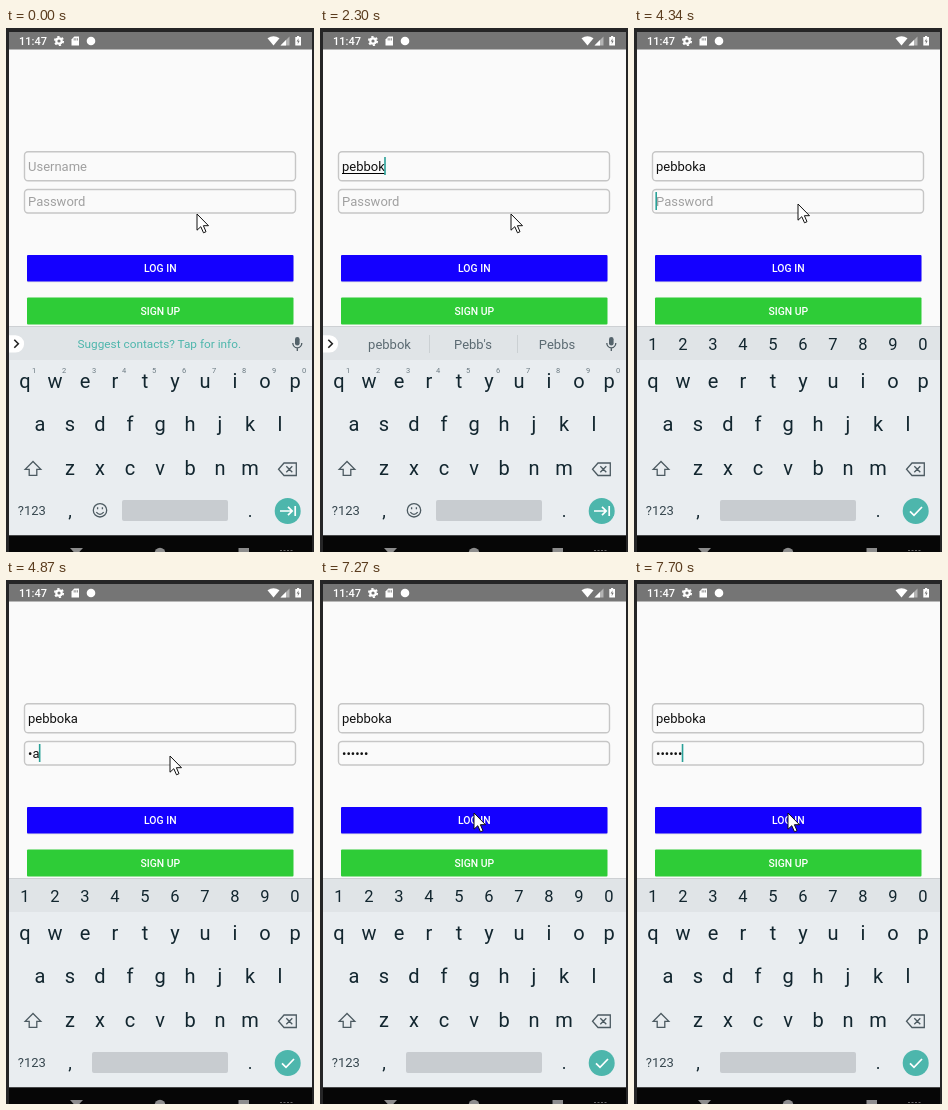
Recreate the animation shown at these times as an HTML page. Size 308 by 524 pixels, loop 8000 ms.

```html
<!DOCTYPE html>
<html lang="en">
<head>
<meta charset="utf-8">
<title>Log in form</title>
<style>
  html, body { margin: 0; width: 100%; height: 100%; overflow: hidden; background: #222; }
  svg { display: block; width: 308px; height: 524px; font-family: Roboto, sans-serif; }
  text { white-space: pre; }
  .mid { text-anchor: middle; }
  .line { fill: none; stroke: #4c5a61; stroke-width: 1.3; }
  .field { fill: none; stroke: #c6c6c6; stroke-width: 1.4; }
  .button { font-size: 10.4px; font-weight: 500; fill: #fff; text-anchor: middle; }
</style>
</head>
<body>
<svg viewBox="0 0 308 524">
  <rect width="308" height="524" fill="#252526"/>
  <rect x="3" y="4" width="303" height="18" fill="#757575"/>
  <rect x="3" y="21.5" width="303" height="277" fill="#fafafa"/>

  <g id="status" fill="#fff">
    <text x="13" y="17" font-size="11" font-weight="500">11:47</text>
    <circle cx="53" cy="13" r="2.7" fill="none" stroke="#fff" stroke-width="2.2"/>
    <circle cx="53" cy="13" r="4.2" fill="none" stroke="#fff" stroke-width="1.8" stroke-dasharray="2.2 2.2"/>
    <path d="M65.5 11.5L68.3 8.5H73V17.5H65.5Z"/>
    <path d="M68.2 10.2V12.5M69.8 10.2V12.5M71.4 10.2V12.5" stroke="#757575" stroke-width=".8"/>
    <circle cx="85" cy="13" r="4.3"/>
    <path d="M261.5 10.3Q267.5 6 273.5 10.3L267.5 17.5Z"/>
    <path d="M274.5 17.5L283.5 8.5V17.5Z" opacity=".45"/>
    <path d="M274.5 17.5L280 12V17.5Z"/>
    <path d="M289.3 9H291V8H293.2V9H295V17.5H289.3Z"/>
    <path d="M292.6 10.2L290.6 13.6H292L291.7 16.2L293.7 12.8H292.3Z" fill="#757575"/>
  </g>

  <rect class="field" x="18.5" y="123.7" width="271" height="29" rx="3.5"/>
  <rect class="field" x="18.5" y="161.5" width="271" height="23.5" rx="3.5"/>
  <text id="user" x="22" y="143.3" font-size="13"></text>
  <rect id="underline" x="22" y="145" height="1"/>
  <text id="pass" x="22" y="178.2" font-size="13"></text>
  <rect id="caret" width="1.6" height="18" fill="#2aa198"/>

  <rect x="21" y="228" width="266.5" height="26.3" rx="1" fill="#000" opacity=".16"/>
  <rect x="21" y="227" width="266.5" height="26.5" rx="1" fill="#fafafa"/>
  <g id="login">
    <rect x="21" y="227" width="266.5" height="26.5" rx="1" fill="#1400ff"/>
    <text class="button" x="154.3" y="244">LOG IN</text>
  </g>
  <rect x="21" y="269.5" width="266.5" height="27" rx="1" fill="#2ecc37"/>
  <text class="button" x="154.3" y="286.8">SIGN UP</text>

  <rect x="3" y="298.5" width="303" height="209" fill="#e9edf0"/>
  <rect x="3" y="298.5" width="303" height="33.5" fill="#e0e4e7"/>
  <g id="keys"></g>
  <path class="line" d="M27 433.5L19.2 441.3H23.2V447.3H30.8V441.3H34.8Z"/>
  <path class="line" d="M278 435H290.3V447.5H278L272.5 441.2ZM280.3 438.2L286.3 444.3M286.3 438.2L280.3 444.3"/>
  <text x="11.8" y="487" font-size="13" fill="#37474f">?123</text>
  <rect id="space" y="472" width="106" height="21" rx="2" fill="#c8ccd0"/>
  <circle cx="281.7" cy="483" r="13" fill="#4db6ac"/>
  <path id="action" fill="none" stroke="#fff" stroke-width="1.7"/>

  <g id="textKeys">
    <g class="line">
      <circle cx="94" cy="482.3" r="6.7"/>
      <path d="M90.3 484.2Q94 488.6 97.7 484.2M91.6 479.2V481.2M96.4 479.2V481.2"/>
    </g>
    <path d="M3 307.3H9.5A8.5 8.5 0 0 1 9.5 324.5H3Z" fill="#fff"/>
    <path d="M8.3 311.8L12.3 315.8L8.3 319.8" fill="none" stroke="#222" stroke-width="1.6"/>
    <rect x="289" y="309" width="4.6" height="8.6" rx="2.3" fill="#54636b"/>
    <path class="line" d="M286.8 315A4.5 4.8 0 0 0 295.8 315M291.3 319.8V323"/>
    <text id="tip" class="mid" x="153.3" y="320.3" font-size="11.8" fill="#4db6ac">Suggest contacts? Tap for info.</text>
    <g id="words" class="mid" font-size="13" fill="#5b6a72">
      <path d="M109.5 307V325M197.5 307V325" stroke="#cbd0d3"/>
      <text x="69.5" y="320.7"></text>
      <text x="153" y="320.7"></text>
      <text x="237" y="320.7"></text>
    </g>
  </g>

  <rect x="3" y="507.5" width="303" height="16.5" fill="#060606"/>
  <g fill="#8c8c8c">
    <path d="M64 520H77L70.5 527Z"/>
    <circle cx="154" cy="525" r="5.3"/>
    <rect x="232.5" y="520" width="10.5" height="8"/>
    <path d="M274 522.5H287" stroke="#666" stroke-dasharray="2 1.5"/>
  </g>
  <path id="mouse" d="M0 0V16.2L3.8 12.7L6.5 18.8L9 17.7L6.4 11.7H11.5Z" fill="#fff" stroke="#111" stroke-width="1"/>
</svg>

<script>
const LOOP = 8000;
const $ = id => document.getElementById(id);

function label(parent, x, y, size, fill, string) {
  const el = document.createElementNS('http://www.w3.org/2000/svg', 'text');
  Object.entries({ x, y, fill, 'font-size': size, class: 'mid' })
    .forEach(([name, value]) => el.setAttribute(name, value));
  el.textContent = string;
  parent.append(el);
  return el;
}

const row = (string, x, y, size, fill = '#12262f') =>
  [...string].map((c, i) => label($('keys'), x + i * 30, y, size, fill, c));

row('qwertyuiop', 19, 360, 20);
row('asdfghjkl', 34, 403, 20);
row('zxcvbnm', 64, 446.5, 20);
row(',', 64, 488.5, 18);
row('.', 244, 488.5, 18);
const hints = row('1234567890', 28, 345, 7.5, '#6b7a82');
const digits = row('1234567890', 19, 322, 16.5);

// Each step changes only the listed parts of the state.
const dots = n => '•'.repeat(n);
const steps = [
  [0, { user: '', pass: '', caret: '', composing: true, secure: false,
        tip: true, words: [], mouse: [191, 186], press: 1 }],
  [500, { caret: 'user' }],
  [780, { user: 'pe' }],
  [930, { user: 'pebb' }],
  [1490, { caret: '' }],
  [1890, { caret: 'user' }],
  [2170, { user: 'pebbo' }],
  [2300, { user: 'pebbok', tip: false, words: ['pebbok', "Pebb's", 'Pebbs'] }],
  [2700, { user: 'pebboka', words: ['pebboka', 'Pebb Oka', "Pebb's"] }],
  [3220, { caret: '' }],
  [3370, { mouse: [176, 180] }],
  [3490, { mouse: [168, 178] }],
  [3640, { mouse: [164, 176], caret: 'user' }],
  [3760, { caret: '', composing: false }],
  [3910, { words: [] }],
  [4340, { secure: true, caret: 'pass' }],
  [4870, { pass: dots(1) + 'a' }],
  [4990, { pass: dots(2) + 'b' }],
  [5260, { pass: dots(3) + 'o' }],
  [5380, { pass: dots(4) + 'e' }],
  [5630, { pass: dots(5) + 'n' }],
  [6030, { caret: '' }],
  [6580, { caret: 'pass', mouse: [164, 192] }],
  [6700, { mouse: [164, 211] }],
  [6850, { mouse: [162, 219] }],
  [6970, { mouse: [160, 226] }],
  [7130, { mouse: [154, 233], pass: dots(6), caret: '' }],
  [7400, { press: 0.4 }],
  [7550, { press: 0.7, caret: 'pass' }],
  [7700, { press: 1 }],
];

const show = (el, on) => el.setAttribute('visibility', on ? 'inherit' : 'hidden');
const put = (id, name, value) => $(id).setAttribute(name, value);

// Fills a field and returns the width of the typed text.
function fillField(id, value, hint) {
  $(id).textContent = value || hint;
  put(id, 'fill', value ? '#111' : '#a0a0a0');
  return value ? $(id).getComputedTextLength() : 0;
}

function draw(time) {
  const s = Object.assign({}, ...steps.filter(([at]) => at <= time).map(([, change]) => change));
  const widths = {
    user: fillField('user', s.user, 'Username'),
    pass: fillField('pass', s.pass, 'Password'),
  };
  put('underline', 'width', s.composing ? widths.user : 0);
  show($('caret'), s.caret);
  if (s.caret) {
    put('caret', 'x', 21.4 + widths[s.caret]);
    put('caret', 'y', s.caret === 'user' ? 129 : 164);
  }

  show($('textKeys'), !s.secure);
  hints.forEach(el => show(el, !s.secure));
  digits.forEach(el => show(el, s.secure));
  show($('tip'), s.tip);
  show($('words'), s.words.length);
  $('words').querySelectorAll('text').forEach((el, i) => el.textContent = s.words[i] || '');
  put('space', 'x', s.secure ? 86 : 116);
  put('space', 'width', s.secure ? 136 : 106);
  put('action', 'd', s.secure
    ? 'M276 483.3L280 487.3L288 479'
    : 'M274 483H286M282 478.8L286.2 483L282 487.2M289.2 478V488');

  put('login', 'opacity', s.press);
  put('mouse', 'transform', `translate(${s.mouse})`);
}

const start = performance.now();
function frame() {
  draw((performance.now() - start) % LOOP);
  requestAnimationFrame(frame);
}
frame();
</script>
</body>
</html>
```
